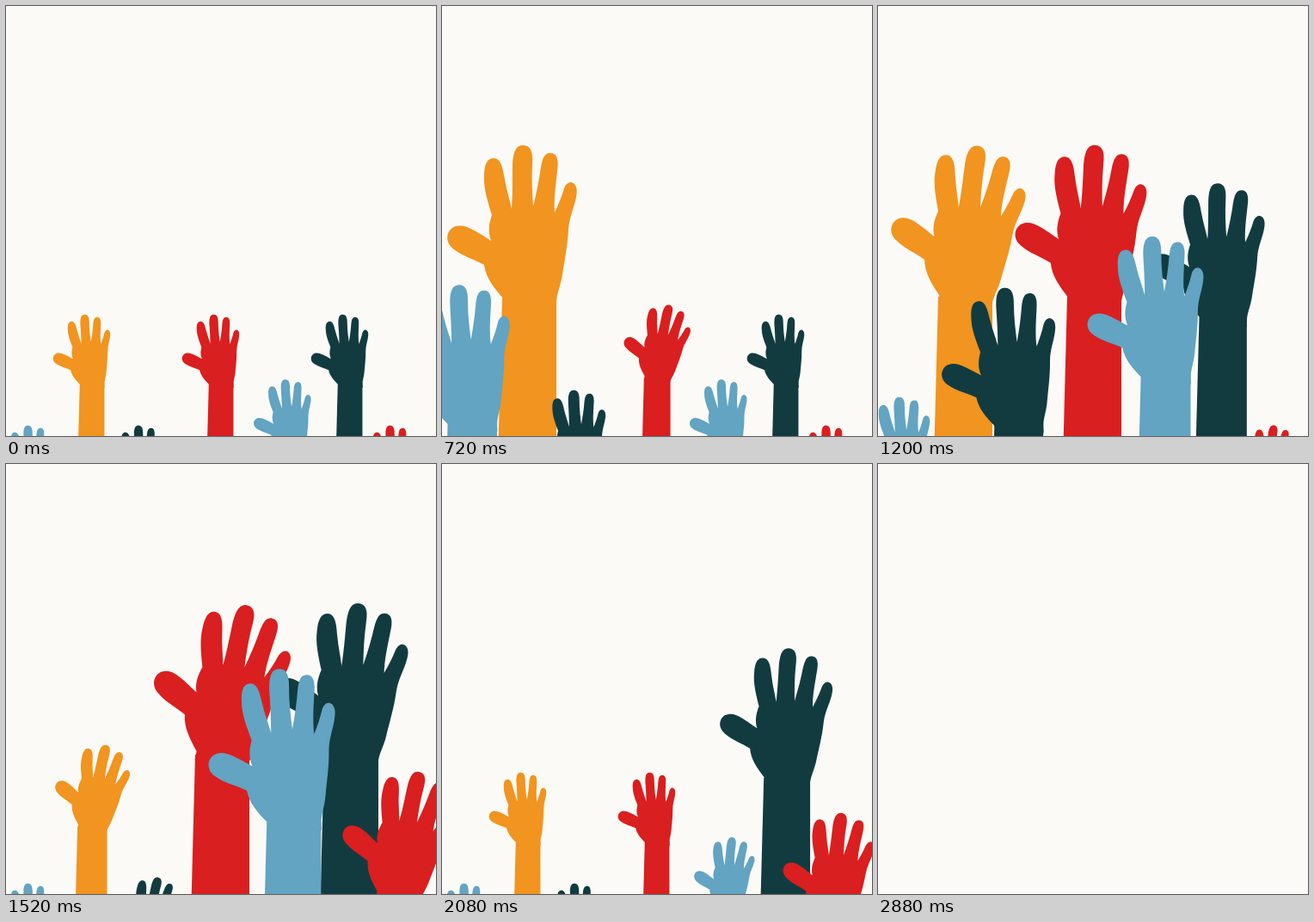
These frames come from a looping animation (500x500 px, 2.92 s). An HTML page:

```html
<!DOCTYPE html>
<html lang="en">
<head>
<meta charset="utf-8">
<title>Raised hands</title>
<style>
html, body { margin: 0; width: 100%; height: 100%; overflow: hidden; background: #fbfaf6; }
svg { display: block; width: 100%; height: 100%; }
</style>
</head>
<body>
<svg id="stage" viewBox="0 0 500 500">
  <defs>
    <path id="arm" d="M70 338H133V720H60Z"/>
    <path id="palm" d="M71 340C60 327 51 316 49 301C36 294 24 291 14 283C4 276 4 264 12 258C24 251 36 260 57 273
      C53 262 55 252 58 243C54 230 48 212 49 198C49 183 53 177 60 177C69 177 71 190 73 202C75 214 79 226 81 236
      C82 222 82 205 82 190C82 172 85 162 94 162C104 162 106 171 105 184C104 202 105 218 106 233
      C110 217 113 202 115 187C117 177 119 171 126 171C134 171 136 179 134 192C132 210 130 225 131 240
      C135 232 139 222 142 212C144 207 147 205 150 205C156 206 158 213 156 222C154 234 148 245 147 260
      C146 280 142 298 140 312C138 326 133 334 133 346V352L71 350Z"/>
  </defs>
</svg>
<script>
const LOOP = 2920, STEP = 40, BLANK = 2880;
const MOVE = 360;        // length of a rise or fall
const FULL = 2.2;        // scale at which the paths are drawn
const SWING = 16;        // widest tilt in degrees
const DRAWN_TILT = 4;    // tilt of the palm path as drawn

const ORANGE = "#f19420", RED = "#d91f1f", DARK = "#123b40", BLUE = "#62a4c1";

// swings: times at which the tilt is in turn none, widest, none, ...
const hands = [
  { color: ORANGE, x: 99, y: 522, max: 2.2, rise: 328, fall: 1285,
    swings: [330, 500, 665, 830, 985, 1150, 1282, 1510, 1680] },
  { color: RED, x: 249, y: 522, max: 2.2, rise: 631, fall: 1604,
    swings: [500, 700, 900, 1085, 1292, 1500, 1700, 1900, 2080] },
  { color: DARK, x: 399, y: 522, max: 2.2, rise: 978, fall: 1934,
    swings: [895, 1080, 1260, 1410, 1650, 1870, 2010, 2160, 2370] },
  { color: BLUE, x: 33, y: 651, max: 2, rise: 215, fall: 973,
    swings: [215, 345, 470, 600, 705, 825, 945, 1070, 1215] },
  { color: DARK, x: 161.5, y: 651, max: 1.98, rise: 576, fall: 1243,
    swings: [705, 820, 940, 1070, 1190, 1300, 1410, 1520, 1630] },
  { color: BLUE, x: 332.3, y: 597.5, max: 2.2, rise: 961, fall: 1640,
    swings: [880, 1040, 1180, 1340, 1500, 1660, 1900, 2030, 2140] },
  { color: RED, x: 454, y: 651, max: 2, rise: 1292, fall: 1900,
    swings: [1120, 1258, 1380, 1515, 1745, 1850, 1960, 2160, 2280] }
];

const stage = document.getElementById("stage");
const scene = add(stage, "g");

function add(parent, tag, attrs = {}) {
  const el = document.createElementNS("http://www.w3.org/2000/svg", tag);
  for (const key in attrs) el.setAttribute(key, attrs[key]);
  return parent.appendChild(el);
}

for (const hand of hands) {
  hand.group = add(scene, "g", { fill: hand.color });
  add(hand.group, "use", { href: "#arm" });
  hand.palm = add(hand.group, "use", { href: "#palm" });
}

function ease(u) {
  u = Math.min(1, Math.max(0, u));
  return u < 0.5 ? 4 * u ** 3 : 1 - 4 * (1 - u) ** 3;
}

function scaleAt(hand, t) {
  const lift = ease((t - hand.rise) / MOVE) - ease((t - hand.fall) / MOVE);
  return 1 + (hand.max - 1) * lift;
}

function tiltAt(swings, t) {
  const next = swings.findIndex(s => s > t);
  if (next < 1) return 0;
  const from = swings[next - 1];
  const phase = next - 1 + (t - from) / (swings[next] - from);
  return SWING * (1 - Math.cos(Math.PI * phase)) / 2;
}

function draw(t) {
  scene.setAttribute("visibility", t >= BLANK ? "hidden" : "visible");
  for (const hand of hands) {
    // the first stretch of the loop is still
    const time = t < 240 ? 0 : t;
    const k = scaleAt(hand, time) / FULL;
    const tilt = tiltAt(hand.swings, time) - DRAWN_TILT;
    hand.group.setAttribute("transform",
      `translate(${hand.x} ${hand.y}) scale(${k}) translate(-99 -522)`);
    hand.palm.setAttribute("transform", `rotate(${tilt} 101 340)`);
  }
}

const start = performance.now();
function tick() {
  const t = (performance.now() - start) % LOOP;
  draw(Math.floor(t / STEP) * STEP);
  requestAnimationFrame(tick);
}
draw(0);
requestAnimationFrame(tick);
</script>
</body>
</html>
```
